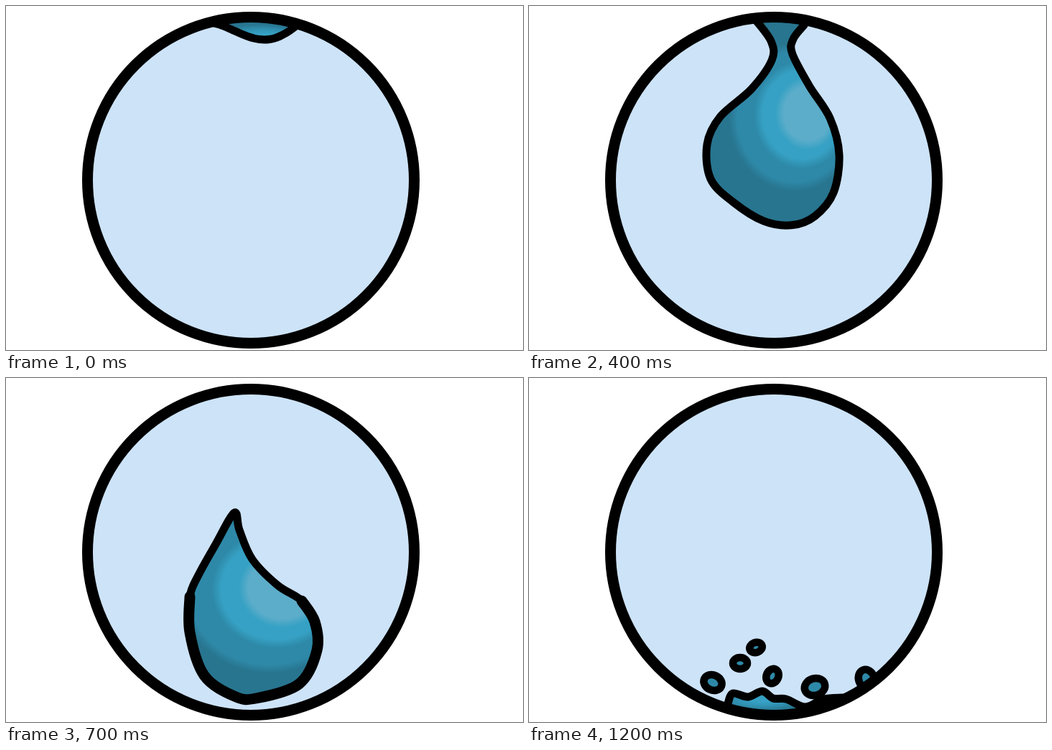
These frames come from a looping animation (720x480 px, 1300 ms). An HTML page with a canvas:

```html
<!DOCTYPE html>
<html lang="en">
<head>
<meta charset="utf-8">
<title>Water drop</title>
<style>
  html, body { margin: 0; width: 100%; height: 100%; overflow: hidden; background: #fff; }
  canvas { display: block; }
</style>
</head>
<body>
<canvas id="stage" width="720" height="480"></canvas>
<script>
(() => {
const ctx = document.getElementById('stage').getContext('2d');
const STEP = 100, CEILING = 12, FLOOR = 480;

// --- Poses: an outline plus a glow [x, y, rx, ry, highlight opacity] ---

const parse = text => text.trim().split(/\s+/).map(p => p.split(',').map(Number));
const pose = (pts, glow) => ({ pts, glow });

const mix = (a, b, t) => a.map((v, i) => Array.isArray(v) ? mix(v, b[i], t) : v + (b[i] - v) * t);
const blend = (a, b, t) => pose(mix(a.pts, b.pts, t), mix(a.glow, b.glow, t));

// Scale a pose about a point.
function scale({ pts, glow: [gx, gy, rx, ry, light] }, cx, cy, kx, ky) {
  const move = ([x, y]) => [cx + (x - cx) * kx, cy + (y - cy) * ky];
  return pose(pts.map(move), [...move([gx, gy]), rx * kx, ry * ky, light]);
}

// Narrow the neck of a hanging drop.
function pinch({ pts, glow }) {
  const squeeze = y => 0.5 * Math.exp(-(((y - 70) / 45) ** 2));
  return pose(pts.map(([x, y]) => [x + (355 - x) * squeeze(y), y]), glow);
}

// A shallow bulge below the ceiling.
function sag(left, right, depth, count) {
  return Array.from({ length: count }, (_, i) => {
    const u = i / (count - 1);
    return [left + (right - left) * u, 24 + depth * Math.sin(Math.PI * u ** 1.3)];
  });
}

// Outline of a splash; '^' marks the rounded tip of a finger of water.
function splash(text) {
  const words = text.trim().split(/\s+/), pts = parse(text.replace(/\^/g, ''));
  return pts.flatMap(([x, y], i) => {
    if (words[i][0] !== '^') return [[x, y]];
    const [mx, my] = mix(pts[i - 1], pts[i + 1], 0.5);
    const len = Math.hypot(x - mx, y - my), dx = (x - mx) / len, dy = (y - my) / len;
    return [-1, 1].map(s => [x - 3 * dx - 7 * s * dy, y - 3 * dy + 7 * s * dx]);
  });
}

const bulge = pose(sag(290, 409, 23, 18), [367, 43, 25, 8, 0]);
const nub = pose(sag(325, 396, 28, 8), [367, 40, 12, 6, 0]);
const hang = pose(parse(`310,20 325,45 322,68 300,104 265,138 248,172 253,215 285,244 327,267
  366,272 398,261 424,232 432,185 420,140 400,100 378,60 376,42 390,25`), [388, 134, 39, 39, 1]);
const fall = pose(parse(`350,92 318,131 294,170 276,208 267,258 283,305 322,333 350,336
  404,323 434,288 439,245 422,204 390,172 362,142 357,108`), [396, 182, 45, 44, 1]);
const land = pose(parse(`318,188 292,232 268,275 256,305 256,355 276,415 318,444 348,447
  408,427 433,380 430,340 412,311 378,289 343,253 325,212`), [385, 293, 54, 49, 1]);
const ripple = pose(splash(`185,412 ^214,396 235,412 341,425 440,412 ^464,392 476,410 505,404`),
  [341, 400, 72, 20, 0]);
const wave = pose(splash(`150,374 178,372 198,397 214,398 ^226,354 244,396 258,399 270,362
  284,332 305,305 324,286 330,305 350,327 385,343 410,352 425,353 441,361 ^462,347 456,374
  ^507,343 482,384 515,382`), [378, 338, 47, 39, 1]);
const crown = pose(splash(`172,391 197,400 226,411 ^228,375 250,400 272,411 ^260,357 301,388
  ^311,365 328,391 ^358,331 356,383 ^388,367 390,388 420,380 ^447,342 430,400 468,389
  472,402 500,402`), [350, 385, 72, 20, 0]);
const puddle = pose(parse(`277,454 284,440 305,445 325,437 340,447 358,448 385,459 410,448
  436,446`), [335, 447, 22, 5, 0]);

// Droplets: x, y, size, turn in degrees, from left to right.
const spray = parse('146,333,37,90 193,356,28,90 240,328,31,0 444,332,29,-20 506,319,34,0 520,279,33,-25');
const flying = parse(`171,356,38,0 239,343,31,-10 320,335,28,-60 379,285,28,0 392,314,31,-70
  410,349,37,-70 498,353,41,-25 537,311,34,-15`);
const dropping = parse(`256,425,36,25 294,398,30,0 316,376,28,-20 339,416,31,-65 398,431,39,-18
  470,420,37,-110`);

// --- Timeline, one scene per step ---

const hung = p => ({ ...p, edge: CEILING });
const free = p => ({ ...p, heavy: true });
const pooled = p => ({ ...p, edge: FLOOR });

const scenes = [
  [[hung(bulge)]],
  [[hung(blend(bulge, hang, 1 / 3))]],
  [[hung(blend(bulge, hang, 2 / 3))]],
  [[hung(hang)]],
  [[hung(pinch(scale(hang, 341, CEILING, 1, 1.13)))]],
  [[hung(nub), free(fall)]],
  [[free(scale(blend(fall, land, 0.5), 341, 391, 1, 0.95))]],
  [[free(land)]],
  [[pooled(ripple), free(scale(land, 341, FLOOR, 1.12, 0.83))]],
  [[pooled(wave)], spray],
  [[pooled(crown)], flying],
  [[pooled(scale(crown, 341, 460, 0.85, 0.5))], mix(flying.slice(1, 7), dropping, 0.5)],
  [[pooled(puddle)], dropping]
];

// --- Drawing ---

// Smooth curve through the points (Catmull-Rom).
function curve(pts, closed) {
  const path = new Path2D(), n = pts.length;
  const at = i => pts[closed ? (i + n) % n : Math.max(0, Math.min(n - 1, i))];
  path.moveTo(...pts[0]);
  for (let i = 0; i < (closed ? n : n - 1); i++) {
    const [a, b, c, d] = [at(i - 1), at(i), at(i + 1), at(i + 2)];
    path.bezierCurveTo(
      b[0] + (c[0] - a[0]) / 6, b[1] + (c[1] - a[1]) / 6,
      c[0] - (d[0] - b[0]) / 6, c[1] - (d[1] - b[1]) / 6, c[0], c[1]);
  }
  return path;
}

function softEllipse(x, y, rx, ry, rgb, alpha = 1) {
  const soft = Math.min(0.6, 6 / Math.min(rx, ry));
  const g = ctx.createRadialGradient(0, 0, 0, 0, 0, 1 + soft);
  g.addColorStop((1 - soft) / (1 + soft), `rgb(${rgb})`);
  g.addColorStop(1, `rgba(${rgb},0)`);
  ctx.save();
  ctx.globalAlpha = alpha;
  ctx.translate(x, y);
  ctx.scale(rx, ry);
  ctx.fillStyle = g;
  ctx.fillRect(-2, -2, 4, 4);
  ctx.restore();
}

function stroke(path, width) {
  ctx.lineWidth = width;
  ctx.stroke(path);
}

function drawBody({ pts, glow: [x, y, rx, ry, light], edge, heavy }) {
  const line = curve(pts, edge === undefined), fill = new Path2D(line);
  if (edge !== undefined) {
    fill.lineTo(pts[pts.length - 1][0], edge);
    fill.lineTo(pts[0][0], edge);
  }
  ctx.save();
  ctx.clip(fill);
  ctx.fillStyle = '#28758f';
  ctx.fillRect(0, 0, 720, 480);
  softEllipse(x - 18, y + 5, rx * 2.2, ry * 2.2, '46,137,168');
  softEllipse(x - 8, y + 2, rx * 1.55, ry * 1.55, '54,161,196');
  softEllipse(x, y, rx, ry, '92,173,202', light);
  ctx.restore();
  stroke(line, 11);
  if (heavy) stroke(curve(pts.slice(3, 12)), 15);
}

function drawDroplet([x, y, size, turn]) {
  const ring = new Path2D();
  ring.ellipse(x, y, size / 2 - 5, size * 0.43 - 5, turn * Math.PI / 180, 0, 2 * Math.PI);
  ctx.fillStyle = '#2e89a8';
  ctx.fill(ring);
  stroke(ring, 10.5);
}

const rim = new Path2D();
rim.arc(341, 243, 227.5, 0, 2 * Math.PI);
ctx.strokeStyle = '#000';
ctx.lineCap = ctx.lineJoin = 'round';

function draw([bodies, droplets = []]) {
  ctx.fillStyle = '#fff';
  ctx.fillRect(0, 0, 720, 480);
  ctx.fillStyle = '#cde3f8';
  ctx.fill(rim);
  ctx.save();
  ctx.clip(rim);
  bodies.forEach(drawBody);
  droplets.forEach(drawDroplet);
  ctx.restore();
  stroke(rim, 15);
}

function tick() {
  draw(scenes[Math.floor(performance.now() / STEP) % scenes.length]);
  requestAnimationFrame(tick);
}
tick();
})();
</script>
</body>
</html>
```
